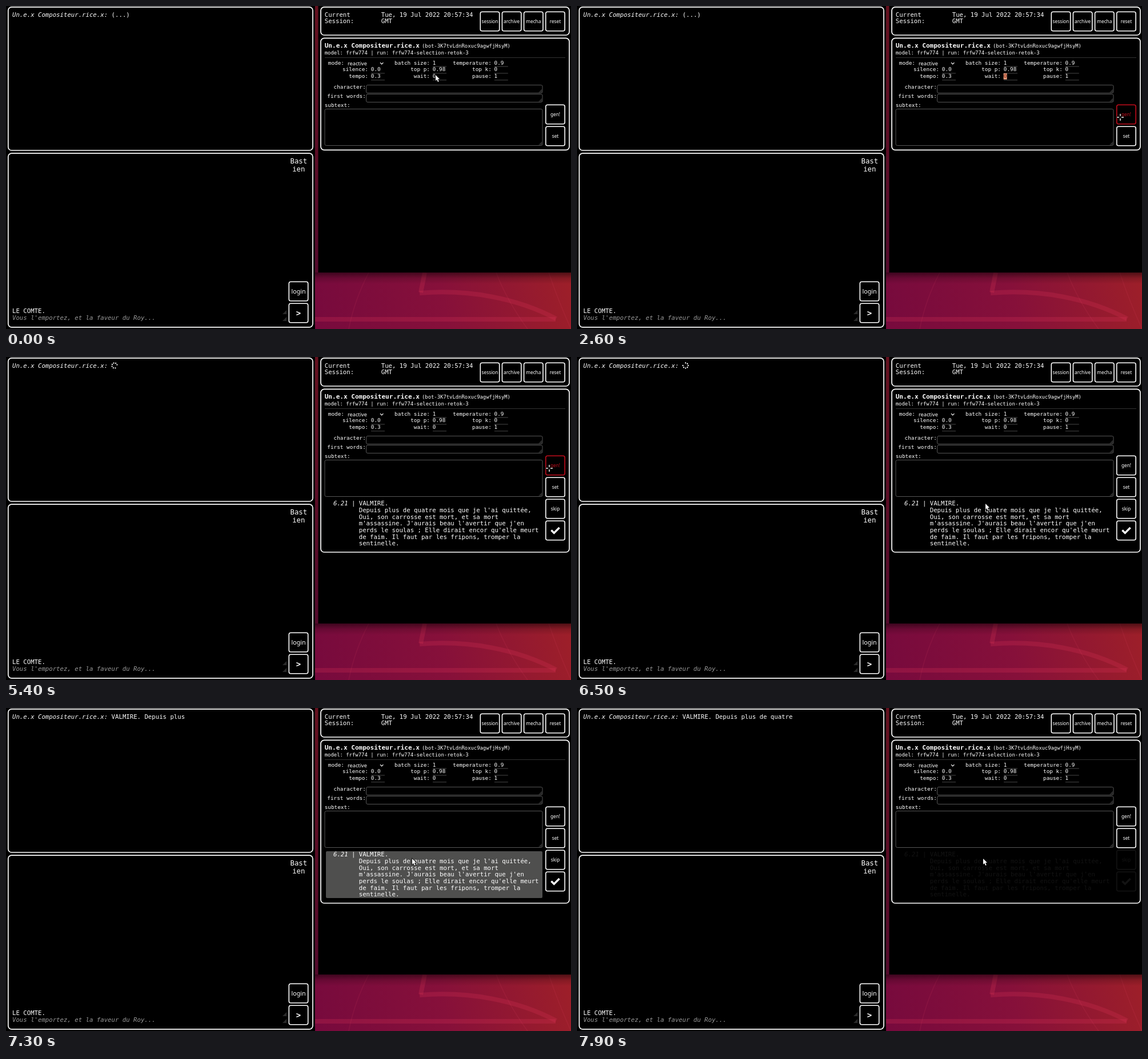
These frames come from a looping animation (989 px wide and 566 px high, 8000 ms). An HTML page with a canvas:

```html
<!DOCTYPE html>
<html lang="fr">
<head>
<meta charset="utf-8">
<title>Session</title>
<style>
html, body { margin: 0; width: 100%; height: 100%; overflow: hidden; background: #000; }
canvas { display: block; width: 989px; height: 566px; }
</style>
</head>
<body>
<canvas id="stage" width="989" height="566"></canvas>
<script>
const ctx = document.getElementById('stage').getContext('2d');
const MONO = '"DejaVu Sans Mono", "Noto Sans Mono", monospace';
const SANS = '"Noto Sans", "Open Sans", sans-serif';
const LOOP = 8000, BIG = 10.68, SMALL = 9.36;
const WHITE = '#fff', RED = '#c20d1c', GREY = '#555';
const BOT = 'Un.e.x Compositeur.rice.x';
const REPLY = [
  'VALMIRE.',
  "Depuis plus de quatre mois que je l'ai quittée,",
  'Oui, son carrosse est mort, et sa mort',
  "m'assassine. J'aurais beau l'avertir que j'en",
  "perds le soulas ; Elle dirait encor qu'elle meurt",
  'de faim. Il faut par les fripons, tromper la',
  'sentinelle.'
];
const WORDS = (REPLY[0] + ' ' + REPLY[1]).split(' ');

// Pointer stops: time, x, y
const PATH = [
  [0, 752, 121], [499, 752, 121], [500, 753.5, 122.5], [1200, 753.5, 122.5],
  [1500, 731.5, 123], [1700, 731.5, 123], [2000, 800, 165], [2200, 885, 208],
  [2400, 938, 206], [2600, 951, 195], [5600, 951, 195], [5800, 930, 215],
  [6000, 872, 262], [6200, 790, 294], [6500, 715, 257], [6700, 711, 264], [8000, 711, 264]
];

function text(s, x, y, size = BIG, opt = {}) {
  ctx.font = `${opt.style || ''} ${size}px ${opt.font || MONO}`;
  ctx.textAlign = opt.align || 'left';
  ctx.fillStyle = opt.color || WHITE;
  ctx.fillText(s, x, y);
}

function box(x1, y1, x2, y2, r, color = WHITE, width = 1.7, fill) {
  ctx.beginPath();
  ctx.roundRect(x1, y1, x2 - x1, y2 - y1, r);
  if (fill) { ctx.fillStyle = fill; ctx.fill(); }
  if (width) { ctx.strokeStyle = color; ctx.lineWidth = width; ctx.stroke(); }
}

function line(points, color, width) {
  ctx.beginPath();
  points.forEach(([x, y]) => ctx.lineTo(x, y));
  ctx.strokeStyle = color;
  ctx.lineWidth = width;
  ctx.stroke();
}

function shade(x1, y1, x2, y2, ...colors) {
  const g = ctx.createLinearGradient(x1, y1, x2, y2);
  colors.forEach((c, i) => g.addColorStop(i / (colors.length - 1), c));
  return g;
}

function button(label, cx, cy, opt = {}) {
  const color = opt.color || WHITE, size = opt.size || 8.3;
  box(cx - 16.7, cy - 16.7, cx + 16.7, cy + 16.7, 3, color, 1.6);
  text(label, cx, cy + size * 0.34, size, { ...opt, font: opt.font || SANS, align: 'center', color });
}

function grip(x, y, size) {
  ctx.fillStyle = '#2a2a2a';
  ctx.beginPath();
  ctx.moveTo(x, y - size);
  ctx.lineTo(x, y);
  ctx.lineTo(x - size, y);
  ctx.fill();
}

function area(x1, y1, x2, y2) {
  box(x1, y1, x2, y2, 2.5, GREY, 1);
  grip(x2 - 1, y2 - 1, 6);
}

function wallpaper() {
  ctx.fillStyle = shade(541, 566, 989, 480, '#770a3d', '#86103a', '#9d1f29');
  ctx.fillRect(541, 467, 448, 99);

  const band = 'rgba(215,50,85,.25)', faint = 'rgba(225,70,100,.13)';
  line([[733, 467], [726, 502]], band, 8);
  line([[541, 549], [962, 549]], band, 8);
  ctx.beginPath();
  ctx.moveTo(724, 503);
  ctx.bezierCurveTo(810, 496, 895, 512, 963, 548);
  ctx.strokeStyle = band;
  ctx.lineWidth = 8;
  ctx.stroke();
  ctx.strokeStyle = faint;
  ctx.lineWidth = 1.5;
  for (const [x, bend, end] of [[635, 610, 600], [858, 876, 913], [950, 966, 989]]) {
    ctx.beginPath();
    ctx.moveTo(x, 467);
    ctx.quadraticCurveTo(bend, 515, end, 566);
    ctx.stroke();
  }

  // Shadow under the right window, and the strip beside it
  ctx.fillStyle = shade(0, 467, 0, 487, 'rgba(0,0,0,.5)', 'rgba(0,0,0,.15)', 'rgba(0,0,0,0)');
  ctx.fillRect(541, 467, 448, 20);
  ctx.fillStyle = shade(0, 0, 0, 467, '#65111f', '#540a2c');
  ctx.fillRect(541, 0, 6, 467);
  ctx.fillStyle = '#000';
  ctx.fillRect(0, 0, 541, 566);
  ctx.fillRect(546.5, 0, 443, 467);
}

function spinner(t) {
  ctx.fillStyle = WHITE;
  for (let i = 0; i < 7; i++) {
    const a = (i * 45 + (t - 3000) * 0.18) * Math.PI / 180;
    ctx.beginPath();
    ctx.arc(190 + 4.6 * Math.cos(a), 15 + 4.6 * Math.sin(a), 1.15, 0, 7);
    ctx.fill();
  }
}

function leftSide(t) {
  box(3.8, 1.9, 537, 253, 6);
  box(3.8, 258.2, 537, 562.8, 6);
  text(BOT + ':', 11, 18.8, BIG, { style: 'italic' });
  if (t < 3000) text('(...)', 184.6, 18.8);
  else if (t < 6700) spinner(t);
  else text(WORDS.slice(0, 1 + Math.floor((t - 6700) / 300)).join(' '), 184.6, 18.8);

  text('Bast', 512.3, 275.8, 12.3, { align: 'center' });
  text('ien', 512.3, 290, 12.3, { align: 'center' });
  button('login', 512, 500, { size: 10.7 });
  button('>', 512, 538, { size: 14, font: MONO, style: 'bold' });
  text('LE COMTE.', 11, 537.6);
  text("Vous l'emportez, et la faveur du Roy...", 11, 549.5, BIG, { style: 'italic', color: '#999' });
  grip(491, 540, 7);
  grip(491, 552, 7);
}

function field(label, value, x, y) {
  text(label, x, y, SMALL, { align: 'right' });
  text(value, x + 4.8, y, SMALL);
  line([[x + 5, y + 3.5], [x + 29, y + 3.5]], '#484848', 1);
}

function settings(t) {
  text('mode:', 592, 102.5, SMALL, { align: 'right' });
  text('reactive', 598, 103.5, 9.2, { font: SANS });
  line([[655, 99.2], [657.7, 101.9], [660.4, 99.2]], WHITE, 1.2);
  field('silence:', '0.0', 634, 114.4);
  field('tempo:', '0.3', 634, 126.3);
  field('batch size:', '1', 742, 102.5);
  field('top p:', '0.98', 742, 114.4);
  field('wait:', '0', 742, 126.3);
  field('temperature:', '0.9', 849.8, 102.5);
  field('top k:', '0', 849.8, 114.4);
  field('pause:', '1', 849.8, 126.3);

  if (t >= 1400 && t < 2800) {
    ctx.fillStyle = '#f0a482';
    ctx.fillRect(746.6, 118, 6, 10.6);
    text('0', 746.8, 126.3, SMALL, { color: '#7a1808' });
  } else if (t >= 800 && t < 1100) {
    line([[753, 118], [753, 128]], WHITE, 1);
  }
}

function reply(t) {
  const flash = t >= 6700 ? Math.max(0, 1 - (t - 6672) / 909) : 0;
  const k = Math.min(1, Math.max(0, (t - 7570) / 400));
  ctx.save();
  ctx.globalAlpha = 0.5 + Math.cos(Math.PI * k) / 2;
  if (flash) box(560, 251, 939, 333, 2, '', 0, `rgba(255,255,252,${flash})`);
  text('6.21', 573, 260.2, BIG, { style: 'italic' });
  text('|', 605, 260.2);
  REPLY.forEach((s, i) => text(s, 617.7, 260.2 + i * 11.67));
  button('skip', 961.5, 266);
  button('', 961.5, 304);
  line([[954.5, 303.6], [959.3, 308.4], [968.6, 299.1]], WHITE, 3.5);
  ctx.restore();
}

function rightSide(t, x) {
  const open = t >= 5100;
  box(551, 1.9, 986, 51, 6);
  box(551, 56.3, 986, open ? 342 : 252.3, 6);
  text('Current', 557.7, 18.8);
  text('Session:', 557.7, 30.4);
  text('Tue, 19 Jul 2022 20:57:34', 656.7, 18.8);
  text('GMT', 656.7, 30.4);
  ['session', 'archive', 'mecha', 'reset'].forEach((s, i) => button(s, 847 + i * 38.15, 27));

  text(BOT, 557.7, 73.2, 11.05, { style: 'bold' });
  text('(bot-3K7tvLdnRoxuc9agwfjHsyM)', 728, 73.2, 8.88);
  text('model: frfw774 | run: frfw774-selection-retok-3', 557.7, 84.5, 8.91);
  line([[558, 90.5], [979, 90.5]], '#333', 1);
  settings(t);

  text('character:', 629.8, 145.3, SMALL, { align: 'right' });
  text('first words:', 629.8, 161.3, SMALL, { align: 'right' });
  text('subtext:', 557.7, 177.3, SMALL);
  area(630.5, 138.5, 939, 152.5);
  area(630.5, 154.5, 939, 168.5);
  area(558, 180.5, 939, 244.5);
  button('gen!', 961.5, 190, { color: x > 944 ? RED : WHITE });
  button('set', 961.5, 228);
  if (open) reply(t);
}

function pointer(t) {
  let i = 1;
  while (t > PATH[i][0]) i++;
  const [t0, x0, y0] = PATH[i - 1], [t1, x1, y1] = PATH[i];
  const k = (t - t0) / (t1 - t0);
  return [x0 + (x1 - x0) * k, y0 + (y1 - y0) * k];
}

function arrow(x, y) {
  ctx.beginPath();
  for (const [dx, dy] of [[0, 0], [0, 10], [2.3, 7.9], [4, 12], [5.7, 11.2], [4, 7.2], [7, 7]]) {
    ctx.lineTo(x + dx, y + dy);
  }
  ctx.closePath();
  ctx.strokeStyle = '#000';
  ctx.lineWidth = 1.4;
  ctx.stroke();
  ctx.fillStyle = WHITE;
  ctx.fill();
}

function ibeam(x, y) {
  for (const [color, w] of [['#000', 2.4], [WHITE, 1]]) {
    line([[x, y - 5], [x, y + 5]], color, w);
    line([[x - 2.3, y - 5], [x + 2.3, y - 5]], color, w);
    line([[x - 2.3, y + 5], [x + 2.3, y + 5]], color, w);
  }
}

function cross(x, y) {
  for (const [color, w, r] of [['#000', 3.2, 6.6], [WHITE, 1.4, 6]]) {
    for (const [dx, dy] of [[1, 0], [-1, 0], [0, 1], [0, -1]]) {
      line([[x + dx * 2, y + dy * 2], [x + dx * r, y + dy * r]], color, w);
    }
  }
}

function draw(t) {
  const [x, y] = pointer(t);
  wallpaper();
  leftSide(t);
  rightSide(t, x);
  const inArea = x > 558 && x < 939 && y > 180 && y < 245;
  if (x > 944) cross(x, y);
  else if ((t >= 500 && t < 1800) || inArea) ibeam(x, y);
  else arrow(x, y);
}

const start = performance.now();
function tick() {
  const t = (performance.now() - start) % LOOP;
  draw(Math.floor(t / 100) * 100);
  requestAnimationFrame(tick);
}
tick();
</script>
</body>
</html>
```
